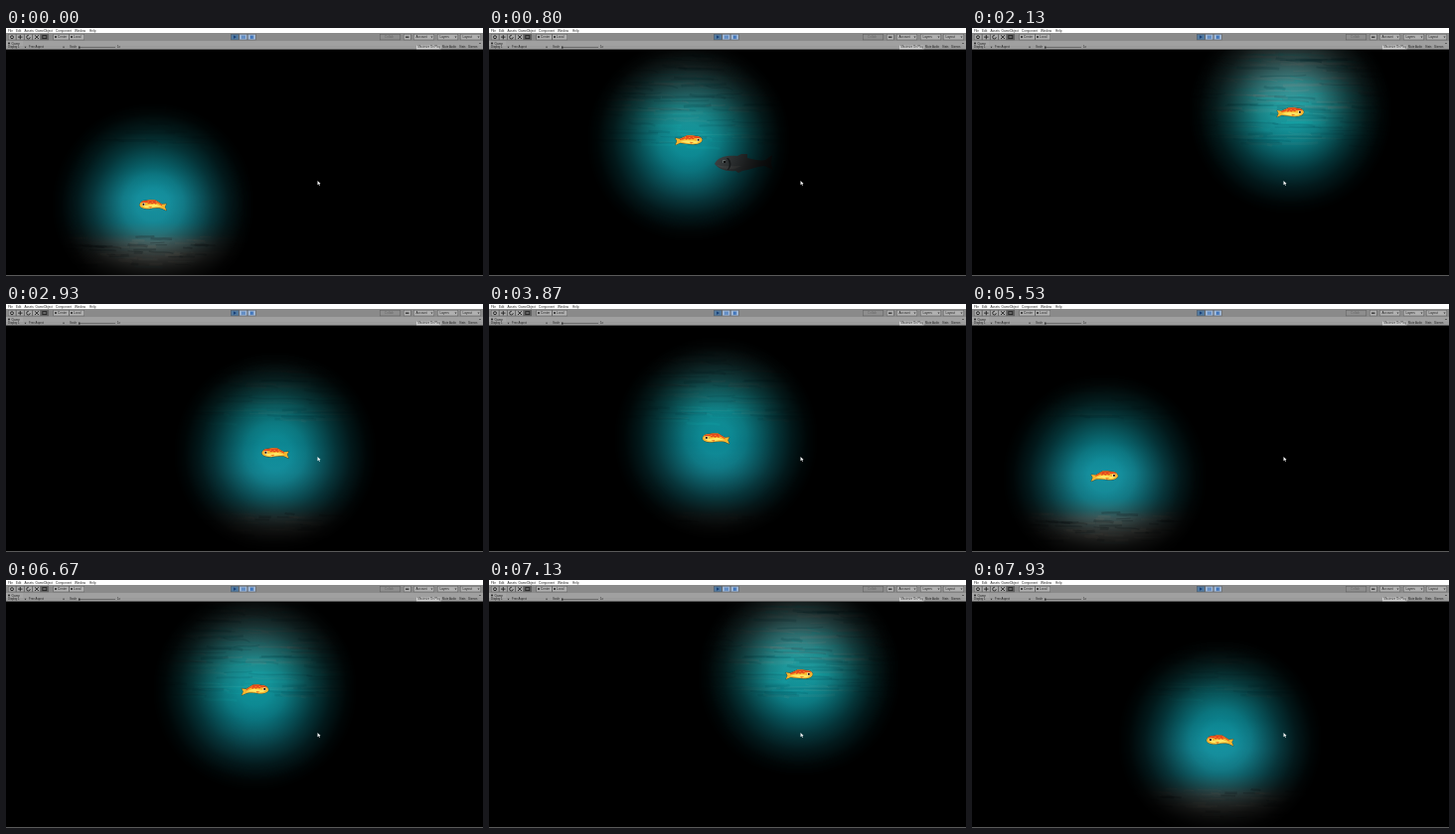
An HTML page with a canvas that plays this animation: 480x250 px, repeating every 8 s.

```html
<!DOCTYPE html>
<html lang="en">
<head>
<meta charset="utf-8">
<title>Fish in the dark</title>
<style>
html, body { margin: 0; width: 100%; height: 100%; overflow: hidden; background: #000; }
canvas { display: block; width: 480px; height: 250px; }
</style>
</head>
<body>
<canvas id="stage" width="480" height="250"></canvas>
<script>
const W = 480, H = 250, TOP = 22, LOOP = 8000, STEP = 200 / 3, LIGHT = 102;
const ctx = document.getElementById('stage').getContext('2d');

// Swim path: time, x, y
const path = [
  [0, 148, 178], [130, 152, 174], [420, 176, 145], [800, 201, 113], [1200, 229, 105], [1730, 264, 104],
  [2130, 320, 85], [2330, 328, 92], [2600, 302, 127], [3000, 266, 152],
  [3500, 240, 146], [3870, 228, 135], [4530, 105, 109], [4850, 98, 98],
  [5200, 104, 127], [5530, 133, 173], [6100, 200, 150], [6670, 251, 110],
  [7130, 312, 95], [7500, 303, 129], [7930, 250, 161], [8000, 243, 164]
];
// Moments at which the fish turns round
const turns = [130, 2300, 4900, 7260];

function layer(w, h, draw) {
  const c = document.createElement('canvas');
  c.width = w;
  c.height = h;
  draw(c.getContext('2d'));
  return c;
}

function seeded(seed) {
  return () => (seed = (seed * 16807) % 2147483647) / 2147483647;
}

function slope(i) {
  const a = path[Math.max(i - 1, 0)], b = path[Math.min(i + 1, path.length - 1)];
  return [0, (b[1] - a[1]) / (b[0] - a[0]), (b[2] - a[2]) / (b[0] - a[0])];
}

function position(t) {
  let i = 0;
  while (i < path.length - 2 && path[i + 1][0] <= t) i++;
  const a = path[i], b = path[i + 1], d = b[0] - a[0], u = (t - a[0]) / d;
  const ma = slope(i), mb = slope(i + 1);
  const at = k => {
    const v = 1 - u;
    return v * v * (1 + 2 * u) * a[k] + u * u * (3 - 2 * u) * b[k]
      + d * u * v * (v * ma[k] - u * mb[k]);
  };
  return [at(1), at(2)];
}

const sea = layer(W, H, g => {
  const rnd = seeded(4711);
  const grad = g.createLinearGradient(0, 0, 0, H);
  [[22, '#65908f'], [55, '#459a9c'], [85, '#1f9c9f'], [112, '#10929a'], [140, '#0d8a96'],
   [170, '#1693a2'], [196, '#178e9c'], [208, '#2f858c'], [216, '#5c8384'], [232, '#686b66'],
   [250, '#333533']]
    .forEach(([y, c]) => grad.addColorStop(y / H, c));
  g.fillStyle = grad;
  g.fillRect(0, 0, W, H);

  const streaks = (n, y0, y1, len, wave, colors) => {
    for (let i = 0; i < n; i++) {
      const x = rnd() * (W + 60) - 60, y = y0 + rnd() * (y1 - y0);
      const l = len * (.4 + rnd()), bend = (rnd() - .3) * wave;
      g.strokeStyle = colors[Math.floor(rnd() * colors.length)];
      g.lineWidth = .7 + rnd() * 2.2;
      g.beginPath();
      g.moveTo(x, y);
      g.bezierCurveTo(x + l * .3, y + bend, x + l * .7, y - bend * .4, x + l, y + bend * .8);
      g.stroke();
    }
  };
  streaks(330, 24, 84, 40, 9, ['rgba(165,165,160,.17)', 'rgba(0,70,80,.2)', 'rgba(20,175,178,.17)']);
  streaks(170, 70, 120, 50, 8, ['rgba(110,170,165,.13)', 'rgba(0,85,95,.17)', 'rgba(20,185,185,.16)']);
  streaks(260, 210, 240, 20, 5, ['rgba(175,165,150,.17)', 'rgba(20,35,38,.24)', 'rgba(70,120,122,.17)']);
});

const shade = layer(W * 2, H * 2, g => {
  const grad = g.createRadialGradient(W, H, 0, W, H, LIGHT);
  [[0, 0], [.16, .03], [.3, .16], [.45, .4], [.6, .64], [.75, .83], [.9, .96], [1, 1]]
    .forEach(([r, a]) => grad.addColorStop(r, `rgba(0,0,0,${a})`));
  g.fillStyle = grad;
  g.fillRect(0, 0, W * 2, H * 2);
});

const bar = layer(W, TOP, g => {
  const rect = (x, y, w, h, c) => {
    g.fillStyle = c;
    g.fillRect(x, y, w, h);
  };
  const text = (s, x, y, size = 3.1, c = '#202020') => {
    g.fillStyle = c;
    g.font = `${size}px "Liberation Sans", Arial, sans-serif`;
    g.fillText(s, x, y);
  };
  const button = (x, w, c = '#b0b0b0') => {
    rect(x, 6, w, 6.2, '#5c5c5c');
    rect(x + .5, 6.5, w - 1, 5.2, c);
  };
  const line = (...p) => {
    g.beginPath();
    for (let i = 0; i < p.length; i += 2) g.lineTo(p[i], p[i + 1]);
    g.stroke();
  };
  const arrow = (x, y) => {
    g.fillStyle = '#333';
    g.beginPath();
    g.moveTo(x, y);
    g.lineTo(x + 2, y);
    g.lineTo(x + 1, y + 1.4);
    g.fill();
  };

  rect(0, 0, W, 5, '#fff');
  rect(0, 5, W, 8, '#8a8a8a');
  rect(0, 13, W, 5, '#a0a0a0');
  rect(0, 13, 17, 5, '#a6a6a6');
  rect(0, 18, W, 3, '#9b9b9b');
  rect(0, 21, W, 1, '#5a5a5a');

  [['File', 2], ['Edit', 10], ['Assets', 18.5], ['GameObject', 29.5], ['Component', 50],
   ['Window', 69], ['Help', 84]].forEach(([s, x]) => text(s, x, 3.6));

  for (let i = 0; i < 5; i++) button(2 + i * 8.2, 8.2, i < 4 ? '#a9a9a9' : '#686868');
  g.strokeStyle = '#222';
  g.lineWidth = .9;
  g.beginPath();
  g.arc(6, 9.2, 1.5, 0, 7);
  g.moveTo(24.3, 9.2);
  g.arc(22.5, 9.2, 1.8, 0, 5);
  g.stroke();
  line(14.3, 7, 14.3, 11.3);
  line(12, 9.1, 16.6, 9.1);
  line(29, 11, 33, 7.2);
  line(29, 7.3, 33, 11);
  g.strokeRect(36.8, 7.6, 4, 3);

  button(47.5, 16);
  button(63.5, 15.5);
  rect(49, 8, 2, 2, '#444');
  rect(65, 8, 2, 2, '#444');
  text('Center', 52, 10.2);
  text('Local', 68, 10.2);

  [226, 234.5, 243].forEach((x, i) => button(x, 8.5, i ? '#9db6d6' : '#52799f'));
  g.fillStyle = '#173f78';
  g.beginPath();
  g.moveTo(229, 7.4);
  g.lineTo(232, 9.1);
  g.lineTo(229, 10.8);
  g.fill();
  rect(237.4, 7.6, 1, 3.2, '#2864b4');
  rect(239.4, 7.6, 1, 3.2, '#2864b4');
  rect(246, 7.6, 1.6, 3.2, '#2864b4');
  rect(248.2, 7.6, .8, 3.2, '#2864b4');

  button(376, 21, '#8e8e8e');
  text('Collab', 381, 10.2, 3.1, '#666');
  button(400, 7.5);
  rect(402, 8.4, 3.5, 1.6, '#444');
  [['Account', 410], ['Layers', 434], ['Layout', 457]].forEach(([s, x]) => {
    button(x, 21);
    text(s, x + 2.5, 10.2);
    arrow(x + 17.5, 8.5);
  });

  rect(2, 14.6, 2, 1.7, '#333');
  text('Game', 5.5, 16.6);
  rect(476, 15, 2, .6, '#333');
  text('Display 1', 2, 20.4, 2.8);
  arrow(18.5, 18.8);
  text('Free Aspect', 23, 20.4, 2.8);
  arrow(57, 18.8);
  text('Scale', 64, 20.4, 2.8);
  rect(73, 19.2, 37, .7, '#555');
  rect(73, 18.5, 1.5, 2.1, '#333');
  text('1x', 112, 20.4, 2.8);
  rect(413, 17.7, 24.5, 3.6, '#d2d2d2');
  text('Maximize On Play', 414.5, 20.4, 2.8);
  text('Mute Audio', 439, 20.4, 2.8);
  text('Stats', 456, 20.4, 2.8);
  text('Gizmos', 465, 20.4, 2.8);
});

function shape(color, d) {
  ctx.fillStyle = color;
  ctx.fill(new Path2D(d));
}

function darkFish(t) {
  ctx.save();
  ctx.translate(316 - t * .08, 136);
  shape('#4d5355', `M-25 1C-22-6-13-8-2-7L2-9L8-9L8-5C16-3 21-2 26-3L33-8L32 1L34 7
    L25 3C17 4 10 7 3 8L-1 10L-4 8C-14 9-21 6-25 1Z`);
  shape('#5f6464', 'M-23 2C-17 4-8 3 2 3C-4 7-16 8-23 2Z');
  shape('#262c2e', 'M-13-5Q-8 1-12 7L-11 7Q-6 1-11-5Z');
  shape('#899493', 'M-17-3h3v3h-3Z');
  shape('#0a0d0e', 'M-16-2h2v2h-2Z');
  ctx.restore();
}

function goldfish(x, y, t) {
  const right = turns.filter(k => t >= k).length % 2;
  const bend = .5 + .5 * Math.cos(t / 1330 * 2 * Math.PI);
  const tail = 1 + bend * 1.2, mid = -bend * .6;
  const body = `M13.5 ${-.8 + bend}C12.5-3.2 10-4 7-4L3-4.7L-2-4.5L-4-3.4L-9 ${tail - 2.4}
    L-13.4 ${tail - 3}L-11.8 ${tail}L-13.4 ${tail + 3.8}L-8.5 ${tail + 1.6}
    C-5 ${3.6 + mid} 0 ${3.8 + mid} 4 4.2C9 4.4 13.5 3 13.5 ${-.8 + bend}Z`;
  ctx.save();
  ctx.translate(x, y);
  ctx.scale(right ? 1 : -1, 1);
  ctx.strokeStyle = 'rgba(80,40,10,.7)';
  ctx.lineWidth = .8;
  ctx.stroke(new Path2D(body));
  shape('#f8b62e', body);
  shape('#ffe765', `M-9 ${tail}L-2 ${.2 + mid}L5 .4L11 1.4Q8 3.6 3 3.4L-3 ${2.8 + mid}Z`);
  shape('#e5481d', `M12.4-1.8C11-3.6 9-3.9 7-3.9L3-4.6L-2-4.4L-4-3.3L-9 ${tail - 2.2}L-9 ${tail - 1}
    L-5 ${-.8 + mid}L-4-1.7L-2.5-.2L-1-1.6L1-.4L2.5-1.6L4.5-.7L6-2Z`);
  shape('#f58a25', 'M-4-2.7h1.5v1H-4ZM0-3h1.5v1H0ZM4-3.2h1.5v1H4Z');
  shape('#e87a24', 'M1 1.8L5 2.3L2 3.8Z');
  shape('#fff3c4', 'M8-1.6h2.8v2.6H8Z');
  shape('#160b08', 'M8.7-1.2h1.8v1.9H8.7Z');
  ctx.restore();
}

function pointer() {
  shape('#f4f4f4', 'M313.5 154v4.2l1-.9.7 1.5.8-.4-.7-1.4h1.3Z');
}

function render(now) {
  const t = Math.floor((now % LOOP + 4) / STEP) * STEP % LOOP;
  const [x, y] = position(t);
  ctx.drawImage(sea, 0, 0);
  darkFish(t);
  ctx.drawImage(shade, x - W, y - H);
  goldfish(x, y, t);
  pointer();
  ctx.drawImage(bar, 0, 0);
  ctx.fillStyle = '#5a5a5a';
  ctx.fillRect(0, H - 1, W, 1);
}

let start;
function tick(now) {
  start ??= now;
  render(now - start);
  requestAnimationFrame(tick);
}
render(0);
requestAnimationFrame(tick);
</script>
</body>
</html>
```
